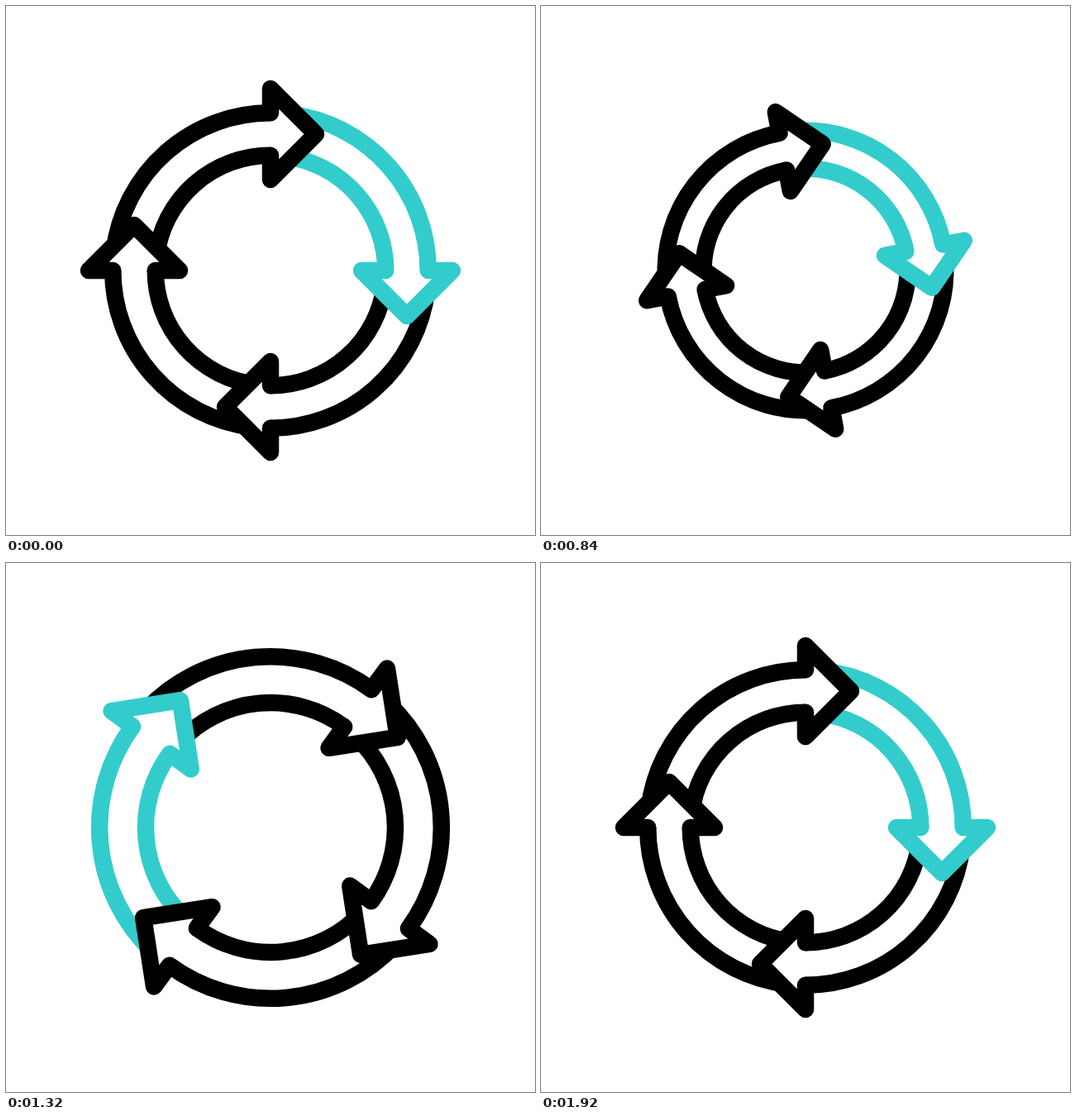
Recreate the animation shown at these times as an HTML page with a canvas. Size 640x640 px, loop 2.12 s.

```html
<!DOCTYPE html>
<html lang="en">
<head>
<meta charset="utf-8">
<title>Turning arrows</title>
<style>
html, body { margin: 0; width: 100%; height: 100%; overflow: hidden; background: #fff; }
canvas { display: block; }
</style>
</head>
<body>
<canvas id="stage" width="640" height="640"></canvas>
<script>
const ctx = document.getElementById('stage').getContext('2d');
const LOOP = 2120, STEP = 40;
const OUTER = 190.75, INNER = 139.25, MID = 165, HEAD = 55, LINE = 20.5;
const TAIL = 7 * Math.PI / 180; // tail start, hidden under the previous head
const COLORS = ['#33cccc', '#000', '#000', '#000'];

// [time, value] keys
const TURN = [[40, 0], [594, -30], [1889, 360]];
const SIZE = [[200, 1], [690, 0.82], [1160, 1.1], [1800, 1]];

// Symmetric cubic-bezier(k, 0, 1 - k, 1)
function ease(x, k) {
  let lo = 0, hi = 1;
  for (let i = 0; i < 24; i++) {
    const s = (lo + hi) / 2, r = 1 - s;
    const at = 3 * r * r * s * k + 3 * r * s * s * (1 - k) + s ** 3;
    if (at < x) lo = s; else hi = s;
  }
  return lo * lo * (3 - 2 * lo);
}

function valueAt(keys, t, k) {
  if (t <= keys[0][0]) return keys[0][1];
  for (let i = 1; i < keys.length; i++) {
    const [t0, a] = keys[i - 1], [t1, b] = keys[i];
    if (t < t1) return a + (b - a) * ease((t - t0) / (t1 - t0), k);
  }
  return keys[keys.length - 1][1];
}

function drawArcs(size) {
  for (const radius of [OUTER, INNER]) {
    ctx.beginPath();
    ctx.arc(0, 0, radius * size, TAIL - Math.PI / 2, 0);
    ctx.stroke();
  }
}

function drawHead(size) {
  const points = [[INNER, 0], [MID - HEAD, 0], [MID, HEAD], [MID + HEAD, 0], [OUTER, 0]];
  ctx.beginPath();
  for (const [x, y] of points) ctx.lineTo(x * size, y * size);
  ctx.fill();
  ctx.stroke();
}

function draw(t) {
  const turn = valueAt(TURN, t, 0.55) * Math.PI / 180;
  const size = valueAt(SIZE, t, 1 / 3);
  ctx.fillStyle = '#fff';
  ctx.fillRect(0, 0, 640, 640);
  ctx.lineWidth = LINE;
  ctx.lineJoin = 'round';
  for (const part of [drawArcs, drawHead]) {
    ctx.lineCap = part === drawHead ? 'round' : 'butt';
    COLORS.forEach((color, i) => {
      ctx.save();
      ctx.translate(320, 320);
      ctx.rotate(turn + i * Math.PI / 2);
      ctx.strokeStyle = color;
      part(size);
      ctx.restore();
    });
  }
}

const start = performance.now();
function tick() {
  const t = (performance.now() - start) % LOOP;
  draw(Math.floor(t / STEP) * STEP);
  requestAnimationFrame(tick);
}
tick();
</script>
</body>
</html>
```
